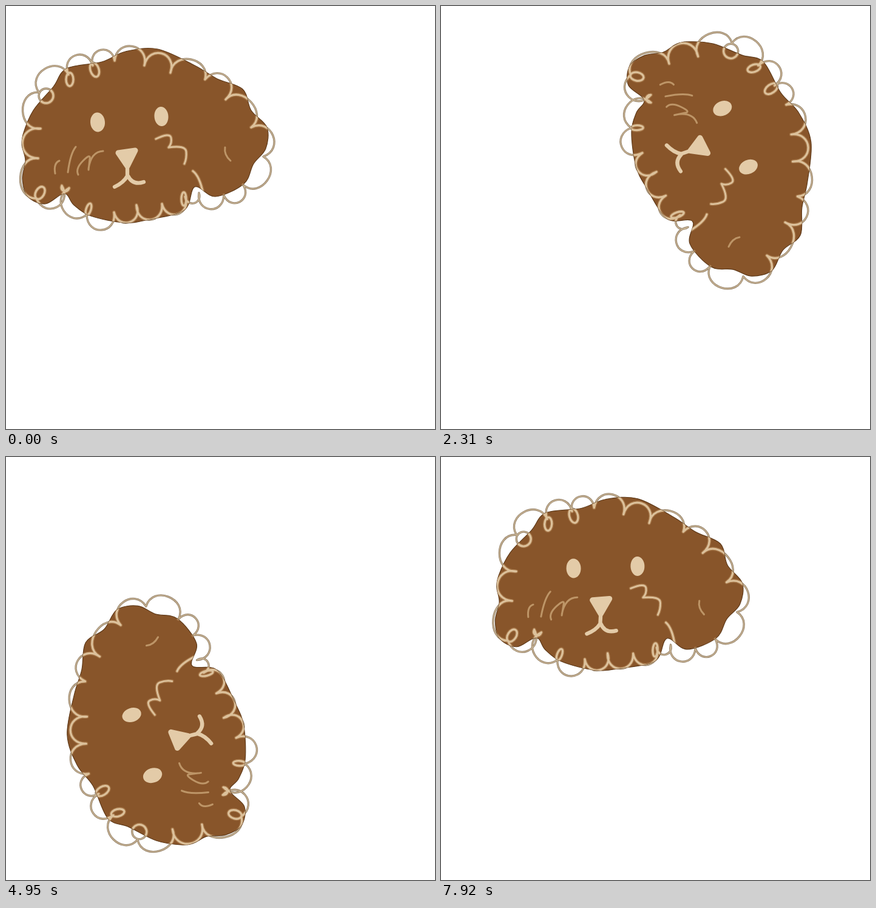
Animation, 707 px wide and 697 px high, one loop 8000 ms. Source, as an HTML page with a canvas:

```html
<!DOCTYPE html>
<html lang="en">
<head>
<meta charset="utf-8">
<title>Rolling curly dog</title>
<style>
html, body { margin: 0; width: 100%; height: 100%; overflow: hidden; background: #fff; }
canvas { display: block; width: 707px; height: 697px; }
</style>
</head>
<body>
<canvas id="stage" width="707" height="697"></canvas>
<script>
const ctx = document.getElementById('stage').getContext('2d');
const LOOP = 8000, STEP = 330;
const HOPS = 3, FLIP = 11, LAST = 22; // steps: end of hops, upside down, turning back
const HALF = 181.65 * Math.PI / 180;
const BROWN = '#88552a', CREAM = '#e3cba8';

const points = text => text.split(' ').map(p => p.split(',').map(Number));

// Closed smooth curve through points
function blob(pts) {
  const path = new Path2D(), n = pts.length;
  const at = i => pts[(i + n) % n];
  path.moveTo(...pts[0]);
  for (let i = 0; i < n; i++) {
    const [a, b, c, d] = [at(i - 1), at(i), at(i + 1), at(i + 2)];
    path.bezierCurveTo(
      b[0] + (c[0] - a[0]) / 6, b[1] + (c[1] - a[1]) / 6,
      c[0] - (d[0] - b[0]) / 6, c[1] - (d[1] - b[1]) / 6, c[0], c[1]);
  }
  return path;
}

// Closed ring of arches that bulge outwards between inward tips
function scallops(tips) {
  const path = new Path2D();
  path.moveTo(...tips[0]);
  tips.forEach(([ax, ay], i) => {
    const [bx, by] = tips[(i + 1) % tips.length];
    const dx = bx - ax, dy = by - ay, len = Math.hypot(dx, dy);
    const lift = Math.min(0.6 * len, 28) / 0.75 / len;
    const nx = dy * lift, ny = -dx * lift;
    path.bezierCurveTo(
      ax + nx - dx * 0.05, ay + ny - dy * 0.05,
      bx + nx + dx * 0.05, by + ny + dy * 0.05, bx, by);
  });
  return path;
}

function oval(path, x, y, rx, ry, tilt) {
  path.moveTo(x + rx * Math.cos(tilt), y + rx * Math.sin(tilt));
  path.ellipse(x, y, rx, ry, tilt, 0, Math.PI * 2);
}

const body = blob(points(
  '28,212 45,172 78,133 100,103 158,92 197,75 250,71 311,98 348,120 390,137 404,172 ' +
  '430,200 428,235 408,260 392,293 345,314 311,298 294,336 235,352 195,357 140,346 ' +
  '112,328 96,309 65,326 36,314 27,285 32,255 27,232'));

const curls = scallops(points(
  '179,90 228,98 271,110 328,121 362,154 404,200 424,248 391,295 359,312 318,308 ' +
  '295,314 257,326 215,328 178,340 133,344 104,300 92,296 50,317 53,251 57,202 ' +
  '54,142 103,113 143,98'));
oval(curls, 66, 148, 12, 12, 0);
oval(curls, 105, 121, 6, 11, 0);
oval(curls, 146, 105, 7, 12, -0.3);
oval(curls, 56, 308, 7, 11, 0.5);
oval(curls, 136, 335, 4, 10, 0.3);
oval(curls, 293, 318, 4, 11, 0);

const earLine = new Path2D('M308 272Q319 280 325 309');
const wisps = new Path2D(
  'M81 276Q78 259 88 255M115 232Q106 243 102 274M119 278Q114 268 127 255T138 252L136 270' +
  'M136 268Q140 240 160 239M361 233Q359 245 370 255');
const cheek = new Path2D('M247 219Q270 208 272 217T268 233Q296 229 297 240T294 260');
const mouth = new Path2D('M200 266V280Q194 291 179 298M201 280Q209 296 227 290');
const nose = new Path2D('M185 242L213 238L200 264Z');
const eyes = new Path2D();
oval(eyes, 151, 191.5, 12, 16, -0.08);
oval(eyes, 256, 182, 11.5, 16, -0.08);

function line(path, color, width) {
  ctx.strokeStyle = color;
  ctx.lineWidth = width;
  ctx.stroke(path);
}

function soft(path, width) {
  line(path, 'rgba(202,160,110,.4)', width + 2.8);
  line(path, '#dcc19b', width);
}

function drawDog() {
  line(curls, '#96836b', 3.4);
  line(curls, '#c9b494', 1.5);

  ctx.fillStyle = BROWN;
  ctx.fill(body);
  line(body, '#5f3a19', 1.2);

  ctx.save();
  ctx.clip(body);
  soft(curls, 3.3);
  soft(earLine, 3.3);
  soft(cheek, 3);
  line(wisps, '#bd9567', 3);
  ctx.restore();

  line(mouth, CREAM, 6.3);
  line(nose, CREAM, 9);
  ctx.fillStyle = CREAM;
  ctx.fill(nose);
  ctx.fill(eyes);
}

// Two hops round a small slanted orbit
function hop(step) {
  const a = step * Math.PI / 2, c = Math.cos(a), s = Math.sin(a);
  ctx.translate(13 - 13 * c - 36.5 * s, 20 - 20 * c + 30 * s);
}

// Each half turn starts slowly and speeds up
function turnAt(step) {
  if (step < FLIP) return HALF * ((step - HOPS) / (FLIP - HOPS)) ** 1.35;
  const halves = (step - FLIP) / 9, whole = Math.floor(halves);
  return HALF * (1 + whole + (halves - whole) ** 1.1);
}

// Roll about a hub, with a wobble that squares off the path
function roll(step) {
  const turn = turnAt(step), a = 3 * turn + 0.35;
  ctx.translate(361 - 9.7 * Math.sin(a), 350 - 9.7 * Math.cos(a));
  ctx.rotate(turn);
  ctx.translate(-297.5, -341.5);
}

function frame(time) {
  const count = Math.floor((time % LOOP) / STEP);
  const step = LAST - Math.abs(LAST - count);
  ctx.setTransform(1, 0, 0, 1, 0, 0);
  ctx.fillStyle = '#fff';
  ctx.fillRect(0, 0, 707, 697);
  ctx.lineCap = ctx.lineJoin = 'round';
  (step <= HOPS ? hop : roll)(step);
  drawDog();
}

let start;
function tick(now) {
  start ??= now;
  frame(now - start);
  requestAnimationFrame(tick);
}
frame(0);
requestAnimationFrame(tick);
</script>
</body>
</html>
```
